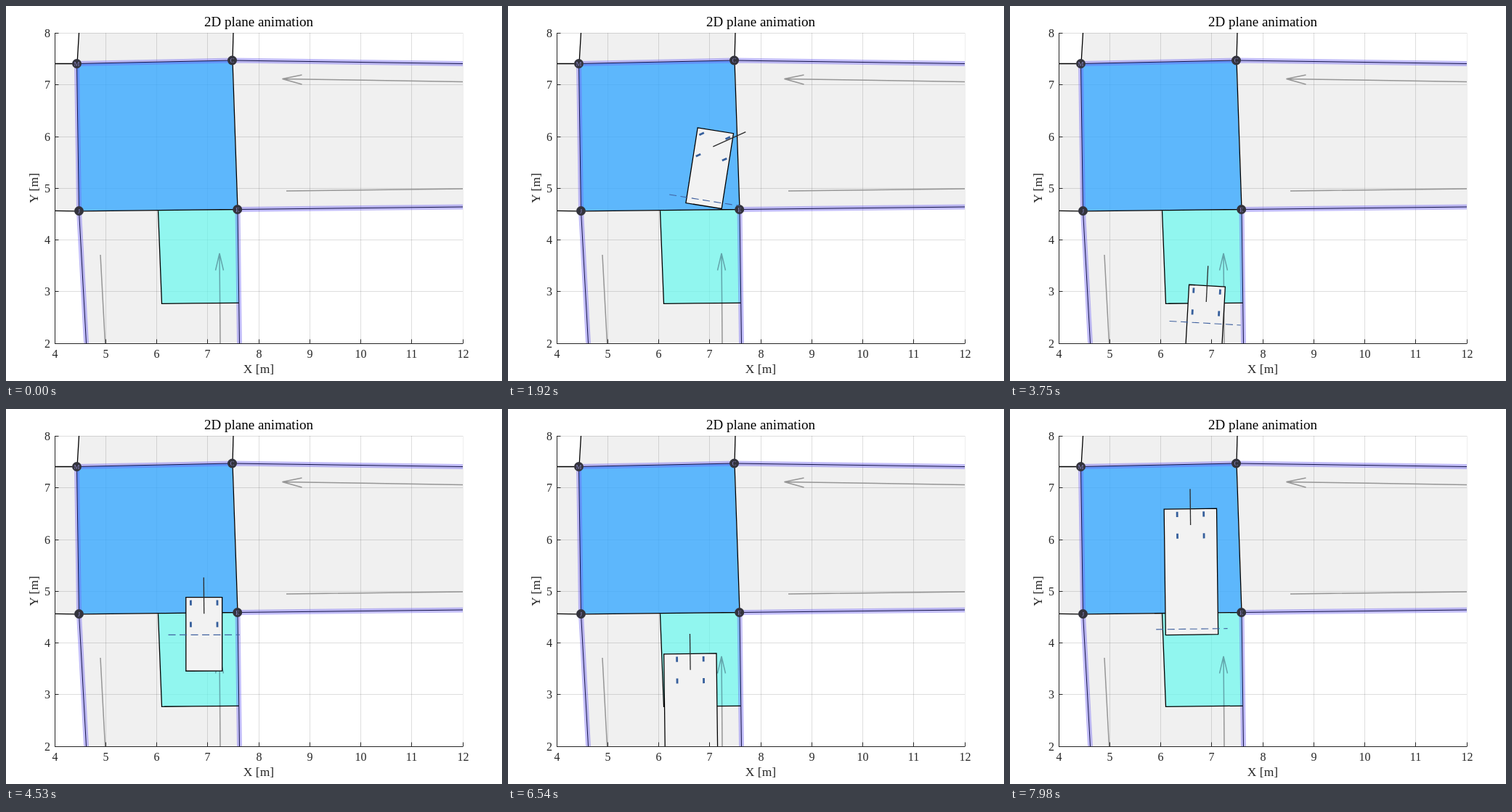
Animation, 683 px wide and 517 px high, one loop 8000 ms. Source, as an HTML page:

```html
<!DOCTYPE html>
<html lang="en">
<head>
<meta charset="utf-8">
<title>2D plane animation</title>
<style>
  html, body { margin: 0; width: 100%; height: 100%; overflow: hidden; background: #fff; }
  svg { display: block; width: 683px; height: 517px; }
  text { font-family: "Liberation Serif", "Noto Serif", serif; font-size: 16px; fill: #262626; text-anchor: middle; }
  .title { font-size: 19px; fill: #000; }
  .label { font-size: 17.5px; }
  #roads { fill: #f0f0f0; }
  #grid { stroke: #262626; stroke-opacity: .15; }
  .crossing { fill: #39a9ff; fill-opacity: .8; }
  .approach { fill: #6af9ef; fill-opacity: .7; }
  .edge { fill: none; stroke: #000; stroke-width: 1.3; }
  .glow { fill: none; stroke: #6a5ef0; stroke-opacity: .4; stroke-width: 7; }
  .core { fill: none; stroke: #15154a; stroke-width: 1; }
  .lane { fill: none; stroke: #969696; stroke-width: 1.5; }
  .node circle { fill: #33333c; }
  .node text { font-size: 9px; fill: #8884c4; }
  #axes { fill: none; stroke: #262626; }
  #body { fill: #f2f2f2; stroke: #000; stroke-width: 1.3; }
  #axle { stroke: #40619f; stroke-width: 1.1; stroke-dasharray: 10 5.5; }
  #wheels { stroke: #365f9c; stroke-width: 2.8; }
  #velocity { stroke: #2b2b2b; stroke-width: 1.3; }
</style>
</head>
<body>
<svg viewBox="0 0 683 517">
  <defs>
    <clipPath id="plot"><rect x="67" y="37" width="562.5" height="428.5"/></clipPath>
    <path id="border" d="M629 79.5 311.5 75 97.5 79.5 100.5 282.5 110.5 465M629 277 319 280.5 321.5 465"/>
  </defs>
  <g clip-path="url(#plot)">
    <path id="roads" d="M100 37H313L312 75 629 79.5V277L319 281 321.5 465H110.5L100.5 283 67 282.5V79.5H98Z"/>
    <path id="grid"/>
    <path class="crossing" d="M97.5 79.5 311.5 75 319 280.5 100.5 282.5Z"/>
    <path class="approach" d="M209.5 282 319 281 320.5 409.3 214.5 410.3Z"/>
    <path class="lane" d="M130 343 136.5 465M629 104.5 380.5 100.5M407.5 95 380.5 100.5 407.5 108M386 255 629 252M295 465 294.6 409"/>
    <path class="lane" style="stroke:#62a5ab" d="M294.6 409 294 341M288.5 364.5 294 341 299.5 364.5"/>
    <use href="#border" class="glow"/>
    <use href="#border" class="core"/>
    <path class="edge" d="M100.5 37 98 79.5H67M313 37 312 75 319 280.5 100.5 282.8 67 282.3M209.5 282 214.5 410.3 320.5 409.3"/>
    <g class="node" id="nodes"></g>
    <g id="vehicle">
      <path id="body"/>
      <path id="axle"/>
      <path id="wheels"/>
      <path id="velocity"/>
    </g>
  </g>
  <path id="axes"/>
  <g id="ticks"></g>
  <text class="title" x="348" y="28">2D plane animation</text>
  <text class="label" x="348" y="506">X [m]</text>
  <text class="label" transform="translate(43.5 251) rotate(-90)">Y [m]</text>
</svg>
<script>
const $ = id => document.getElementById(id);
const SX = 70.25, SY = 71.25, LEFT = 67, BOTTOM = 465;
const LOOP = 8000, STEP = 30, DS = 0.002;
const toX = x => LEFT + (x - 4) * SX;
const toY = y => BOTTOM - (y - 2) * SY;
const point = ([x, y]) => `${toX(x).toFixed(2)} ${toY(y).toFixed(2)}`;
const line = (a, b) => `M${point(a)}L${point(b)}`;

function drawScene() {
  let grid = '', axes = `M${LEFT + .5} 37V465.5H629.5`, labels = '';
  for (let x = 4; x <= 12; x++) {
    const px = Math.floor(toX(x)) + .5;
    grid += `M${px} 37V465`;
    axes += `M${px} 465V459.5`;
    labels += `<text x="${px}" y="484.5">${x}</text>`;
  }
  for (let y = 2; y <= 8; y++) {
    const py = Math.floor(toY(y)) + .5;
    grid += `M67 ${py}H629`;
    axes += `M67 ${py}H72.5`;
    labels += `<text x="57" y="${py + 5}">${y}</text>`;
  }
  $('grid').setAttribute('d', grid);
  $('axes').setAttribute('d', axes);
  $('ticks').innerHTML = labels;
  $('nodes').innerHTML = [['M', 97.5, 79.5], ['C', 311.5, 75], ['J', 100.5, 282.5], ['E', 318.7, 280.5]]
    .map(([name, x, y]) => `<circle cx="${x}" cy="${y}" r="6.5"/><text x="${x}" y="${y + 3}">${name}</text>`)
    .join('');
}

// Monotone cubic through [input, output] knots.
function smooth(knots) {
  const n = knots.length - 1;
  const slope = i => (knots[i + 1][1] - knots[i][1]) / (knots[i + 1][0] - knots[i][0]);
  const tangent = i => {
    if (i === 0) return slope(0) * 1.3;
    if (i === n) return slope(n - 1) * 1.15;
    const a = slope(i - 1), b = slope(i);
    return a * b > 0 ? 2 * a * b / (a + b) : 0;
  };
  return t => {
    let i = 0;
    while (i < n - 1 && t > knots[i + 1][0]) i++;
    const [t0, v0] = knots[i], [t1, v1] = knots[i + 1];
    const h = t1 - t0, u = (t - t0) / h, w = 1 - u;
    return v0 * (1 + 2 * u) * w * w + h * tangent(i) * u * w * w
         + v1 * u * u * (3 - 2 * u) - h * tangent(i + 1) * u * u * w;
  };
}

function linear(knots, t) {
  let i = 0;
  while (i < knots.length - 2 && t > knots[i + 1][0]) i++;
  const [t0, v0] = knots[i], [t1, v1] = knots[i + 1];
  return v0 + (v1 - v0) * Math.min(1, (t - t0) / (t1 - t0));
}

// The hitch follows the course (degrees by distance); the axle trails behind it.
function makeVehicle({ x, course, travel, ...size }) {
  const poses = [];
  const total = travel[travel.length - 1][1];
  let y = 1.3, heading = course[0][1] * Math.PI / 180;
  for (let s = 0; s <= total + DS; s += DS) {
    const aim = linear(course, s) * Math.PI / 180;
    poses.push({ x, y, heading, aim });
    x += Math.cos(aim) * DS;
    y += Math.sin(aim) * DS;
    heading += Math.sin(aim - heading) / size.base * DS;
  }
  const distance = smooth(travel);
  return {
    ...size,
    from: travel[0][0],
    to: travel[travel.length - 1][0],
    pose: step => poses[Math.min(poses.length - 1, Math.round(distance(step) / DS))]
  };
}

const vehicles = [
  makeVehicle({
    x: 6.747, base: 1.05, rear: .11, width: .71,
    course: [[0, 87.2], [1.755, 87.4], [2.5, 88], [4.295, 88], [4.565, 24], [5.565, -25.5], [6.415, -12], [7.3, .5], [12, .7]],
    travel: [[0, 0], [10, 1.4], [27, 2.71], [54, 4.26], [64, 4.565], [81, 5.5], [96, 6.415], [108, 8.84], [114, 10.8]]
  }),
  makeVehicle({
    x: 6.804, base: .41, rear: .7, width: .71,
    course: [[0, 86.2], [1.2, 86.8], [2.3, 88], [2.7, 90.4], [3.67, 90.6], [4.11, 24], [4.51, 2], [5.3, .7], [11, .7]],
    travel: [[114, 0], [124, 1.4], [135, 2.31], [151, 3.27], [162, 3.72], [174, 4.51], [189, 6.36], [203, 10.1]]
  }),
  makeVehicle({
    x: 6.648, base: 2.01, rear: .11, width: 1.03,
    course: [[0, 90.72], [6, 90.72]],
    travel: [[203, 0], [209, 1.1], [218, 2.175], [243, 3.76], [267, 5.04]]
  })
];

function drawVehicle({ base, rear, width, pose }, step) {
  const { x, y, heading, aim } = pose(step);
  const c = Math.cos(heading), s = Math.sin(heading);
  const local = (ahead, side) => [x + ahead * c - side * s, y + ahead * s + side * c];
  const along = ([px, py], a, b) => line(
    [px + a * Math.cos(aim), py + a * Math.sin(aim)],
    [px + b * Math.cos(aim), py + b * Math.sin(aim)]);
  const front = .315, back = -base - rear, half = width / 2;
  const corners = [local(front, half), local(front, -half), local(back, -half), local(back, half)];
  const wheels = [[.21, .26], [.21, -.26], [-.21, .26], [-.21, -.26]];
  $('body').setAttribute('d', `M${corners.map(point).join('L')}Z`);
  $('axle').setAttribute('d', line(local(-base, .7), local(-base, -.7)));
  $('wheels').setAttribute('d', wheels.map(w => along(local(...w), -.05, .05)).join(''));
  $('velocity').setAttribute('d', along([x, y], 0, .7));
}

function render(now) {
  const step = Math.floor((now % LOOP) / STEP);
  const vehicle = vehicles.find(v => step >= v.from && step < v.to);
  $('vehicle').style.display = vehicle && step > 0 ? '' : 'none';
  if (vehicle) drawVehicle(vehicle, step);
}

drawScene();
const start = performance.now();
function tick() {
  render(performance.now() - start);
  requestAnimationFrame(tick);
}
tick();
</script>
</body>
</html>
```
